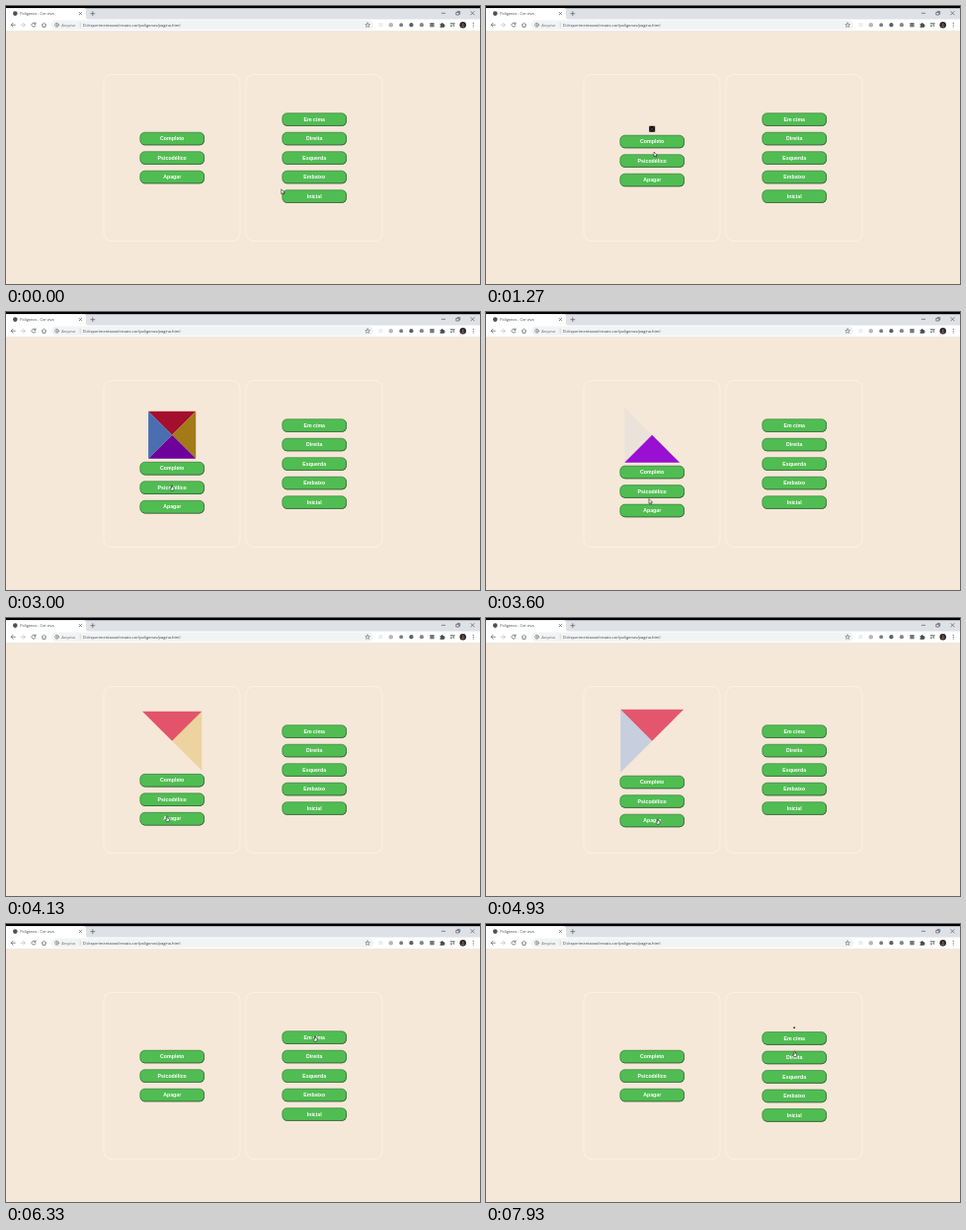
These frames come from a looping animation (480x282 px, 8000 ms). An HTML page:

```html
<!DOCTYPE html>
<html lang="pt-BR">
<head>
<meta charset="utf-8">
<title>Poligonos</title>
<style>
html, body { margin: 0; width: 100%; height: 100%; overflow: hidden; background: #f5e8d8; }
svg { display: block; width: 100%; height: 100%; }
.ui { font-family: "Open Sans", "Noto Sans", sans-serif; font-size: 3.95px; fill: #3c4043; }
.btn text { font: bold 5.25px "Liberation Sans", Arial, sans-serif; fill: #fff; text-anchor: middle; }
.line { fill: none; stroke: #5f6368; stroke-width: .75; stroke-linecap: round; stroke-linejoin: round; }
.panel { fill: none; stroke: #fbf3e8; stroke-width: .9; }
</style>
</head>
<body>
<svg id="stage" viewBox="0 0 480 282">
  <rect width="480" height="282" fill="#f5e8d8"/>

  <!-- browser window -->
  <rect width="480" height="14" fill="#dee1e6"/>
  <rect width="480" height="2.2" fill="#000"/>
  <path d="M0 13.5V2.2H79q2 0 2 2V11.5q0 2 2 2H480V25.3H0Z" fill="#fff"/>
  <path d="M0 25.3H480" stroke="#e3e1de" stroke-width=".5"/>
  <circle cx="9.3" cy="7.6" r="2.3" fill="#4d5156"/>
  <text class="ui" x="14.3" y="9.1" style="font-size:3.75px">Poligonos - Cor viva</text>
  <path class="line" d="M74.2 6.4l2.4 2.4m0-2.4l-2.4 2.4M85.8 7.7h4m-2-2v4M441.3 7.3h3.4M470.8 5.6l3.3 3.3m0-3.3l-3.3 3.3"/>
  <path class="line" d="M456.2 6.4h2.6v2.6h-2.6zM457.1 6.2v-.8h2.6v2.6h-.7" stroke-width=".6"/>

  <rect x="46" y="14.6" width="326" height="9.2" rx="4.6" fill="#f1f3f4"/>
  <path class="line" d="M9.3 19.2H5.2m1.9-2-1.9 2 1.9 2"/>
  <path class="line" d="M15.2 19.2h4.1m-1.9-2 1.9 2-1.9 2" style="stroke:#bdc1c6"/>
  <path class="line" d="M29.7 18a2 2 0 1 0 .2 1.8M30 16.8v1.5h-1.5"/>
  <path class="line" d="M36.3 19.2l2.2-2.1 2.2 2.1M37 18.9v2.4h3v-2.4"/>
  <circle class="line" cx="51.5" cy="19.2" r="1.9" style="stroke-width:.6"/>
  <path class="line" d="M51.5 19v1.1m0-2v.05" style="stroke-width:.6"/>
  <text class="ui" x="56.3" y="20.7" style="fill:#6b7074">Arquivo</text>
  <path d="M75.2 16.8v4.8" stroke="#b9bdc1" stroke-width=".5"/>
  <text class="ui" x="78" y="20.7">D:/experimentacao/ensaio-cor/poligonos/pagina.html</text>
  <path class="line" d="M366.2 16.9l.7 1.6 1.7.1-1.3 1.1.4 1.7-1.5-.9-1.5.9.4-1.7-1.3-1.1 1.7-.1z" style="stroke-width:.55"/>

  <rect x="377.3" y="17" width="4.2" height="4.2" rx=".6" fill="#eceeef"/>
  <circle cx="389.8" cy="19.2" r="2.2" fill="#b5b8bc"/>
  <circle cx="400.2" cy="19.2" r="1.9" fill="#777b80"/>
  <circle cx="410.4" cy="19.2" r="2.1" fill="#5b6067"/>
  <circle cx="420.9" cy="19.2" r="2.1" fill="#85888d"/>
  <rect x="429.3" y="17" width="4.3" height="4.3" fill="#74787d"/>
  <path d="M439.5 17.9h1.3a.9.9 0 0 1 1.8 0h1.1v1.2a.9.9 0 0 1 0 1.8v.8h-4.2v-1.2a.7.7 0 0 0 0-1.5z" fill="#4a4e53"/>
  <path class="line" d="M450.2 17.5h3m-3 1.5h2.5m-2.5 1.5h1.3m2.1.2v-3h.8"/>
  <circle cx="462.7" cy="19.2" r="3.2" fill="#2b2022"/>
  <circle cx="462.7" cy="18.4" r="1" fill="#80604f"/>
  <path d="M460.8 21.3a1.9 1.9 0 0 1 3.8 0" fill="#80604f"/>
  <g fill="#5f6368"><circle cx="473.2" cy="17.4" r=".55"/><circle cx="473.2" cy="19.2" r=".55"/><circle cx="473.2" cy="21" r=".55"/></g>

  <rect class="panel" x="99" y="69.4" width="138" height="169.2" rx="8"/>
  <rect class="panel" x="243" y="69.4" width="138" height="169.2" rx="8"/>
</svg>
<script>
const LOOP = 8000, FULL = 65, GROW = 5000, PITCH = 19.5;
const CLICK = { full: 780, psych: 3080, clear: 5730, top: 7720 };
// top, right, bottom, left
const COLORS = [[220, 20, 60], [218, 165, 32], [148, 0, 211], [100, 149, 237]];
// time, x, y of the pointer tip
const PATH = [
  [0, 278.8, 185.8], [90, 278.8, 185.8], [560, 172, 135], [700, 168.5, 133], [950, 168.5, 133],
  [1500, 171, 157], [2000, 172, 164], [3000, 168, 175.5], [3300, 167, 177],
  [3850, 163.5, 199], [4130, 163.3, 201], [4930, 174, 203.6], [5400, 171, 201],
  [6080, 168, 200.5], [6330, 313, 113.5], [6530, 313, 113.5], [7000, 312.6, 113.2],
  [7740, 312.6, 113.4], [7930, 312.6, 129], [8000, 312.6, 132]
];

const svg = document.getElementById('stage');

function add(parent, tag, attrs, text) {
  const node = document.createElementNS(svg.namespaceURI, tag);
  for (const key in attrs) node.setAttribute(key, attrs[key]);
  if (text) node.textContent = text;
  parent.appendChild(node);
  return node;
}

function makeColumn(cx, firstY, labels) {
  const tris = COLORS.map(() => add(svg, 'path', {}));
  const group = add(svg, 'g', { class: 'btn' });
  labels.forEach((label, i) => {
    const y = firstY + i * PITCH;
    const box = { x: cx - 32.4, y: y - 6.3, width: 64.8, height: 12.6, rx: 4.8 };
    add(group, 'rect', { ...box, x: box.x + .3, y: box.y + .5, fill: '#29402a' });
    add(group, 'rect', { ...box, fill: '#50bd52', stroke: '#34743a', 'stroke-width': .6 });
    add(group, 'text', { x: cx, y: y + 1.85 }, label);
  });
  return { cx, top: firstY - PITCH / 2, tris, group };
}

const left = makeColumn(168.2, 134.5, ['Completo', 'Psicodélico', 'Apagar']);
const right = makeColumn(312.2, 115, ['Em cima', 'Direita', 'Esquerda', 'Embaixo', 'Inicial']);

const ink = { fill: '#fff', stroke: '#111', 'stroke-width': .55, 'stroke-linejoin': 'round' };
const arrow = add(svg, 'path', { ...ink, d: 'M0 0V5L1.2 3.9 2 5.6 2.8 5.2 2 3.6H3.6Z' });
const hand = add(svg, 'path', { ...ink, d: 'M-.5 .4Q0-.3 .5 .4V2.1L2.1 2.6V4.2L1.5 5.6H-.8L-2 3.6-1.3 3.1-.5 3.7Z' });

// cubic-bezier(.25, .1, .25, 1)
function ease(x) {
  if (x <= 0) return 0;
  if (x >= 1) return 1;
  const curve = (u, a, b) => 3 * a * u * (1 - u) ** 2 + 3 * b * u * u * (1 - u) + u ** 3;
  let lo = 0, hi = 1;
  for (let i = 0; i < 24; i++) {
    const mid = (lo + hi) / 2;
    if (curve(mid, .25, .25) < x) lo = mid; else hi = mid;
  }
  return curve(lo, .1, 1);
}

// One side at a time lights up, clockwise, once per second
function psychAlpha(t) {
  const pos = (t - CLICK.psych) % 1000 / 250;
  const side = Math.floor(pos), mix = ease(pos - side);
  return COLORS.map((_, i) => i === side ? 1 - mix : i === (side + 1) % 4 ? mix : 0);
}

function drawColumn(col, grown, alpha) {
  const size = FULL * grown, h = size / 2;
  const x = col.cx, y = col.top;
  const corners = [[x - h, y - h], [x + h, y - h], [x + h, y + h], [x - h, y + h]];
  col.tris.forEach((tri, i) => {
    tri.setAttribute('d', `M${corners[i]}L${corners[(i + 1) % 4]}L${x},${y}Z`);
    const shade = alpha ? 1 : grown;
    tri.setAttribute('fill', `rgb(${COLORS[i].map(c => Math.round(c * shade))})`);
    tri.setAttribute('opacity', size ? (alpha ? alpha[i] : 1) : 0);
  });
  col.group.setAttribute('transform', `translate(0 ${h})`);
  return h;
}

function pointer(t) {
  const i = Math.max(1, PATH.findIndex(p => p[0] > t));
  const [t0, x0, y0] = PATH[i - 1], [t1, x1, y1] = PATH[i];
  const u = (t - t0) / (t1 - t0), s = u * u * (3 - 2 * u);
  return [x0 + (x1 - x0) * s, y0 + (y1 - y0) * s];
}

function overButton(x, y, col, shift, count) {
  const row = (y - shift - col.top) / PITCH;
  return Math.abs(x - col.cx) < 32.5 && row > 0 && row < count &&
    Math.abs(row % 1 - .5) * PITCH < 6.5;
}

function draw(t) {
  const active = t < CLICK.clear;
  const grownLeft = active ? ease((t - CLICK.full) / GROW) : 0;
  const grownRight = ease((t - CLICK.top) / GROW);
  const shiftL = drawColumn(left, grownLeft, active && t >= CLICK.psych ? psychAlpha(t) : null);
  const shiftR = drawColumn(right, grownRight, null);

  const [x, y] = pointer(t);
  const over = overButton(x, y, left, shiftL, 3) || overButton(x, y, right, shiftR, 5);
  const shown = over && t > 90 ? hand : arrow;
  for (const c of [arrow, hand]) c.setAttribute('visibility', c === shown ? 'visible' : 'hidden');
  shown.setAttribute('transform', `translate(${x} ${y})`);
}

const start = performance.now();
function tick() {
  draw((performance.now() - start) % LOOP);
  requestAnimationFrame(tick);
}
tick();
</script>
</body>
</html>
```
